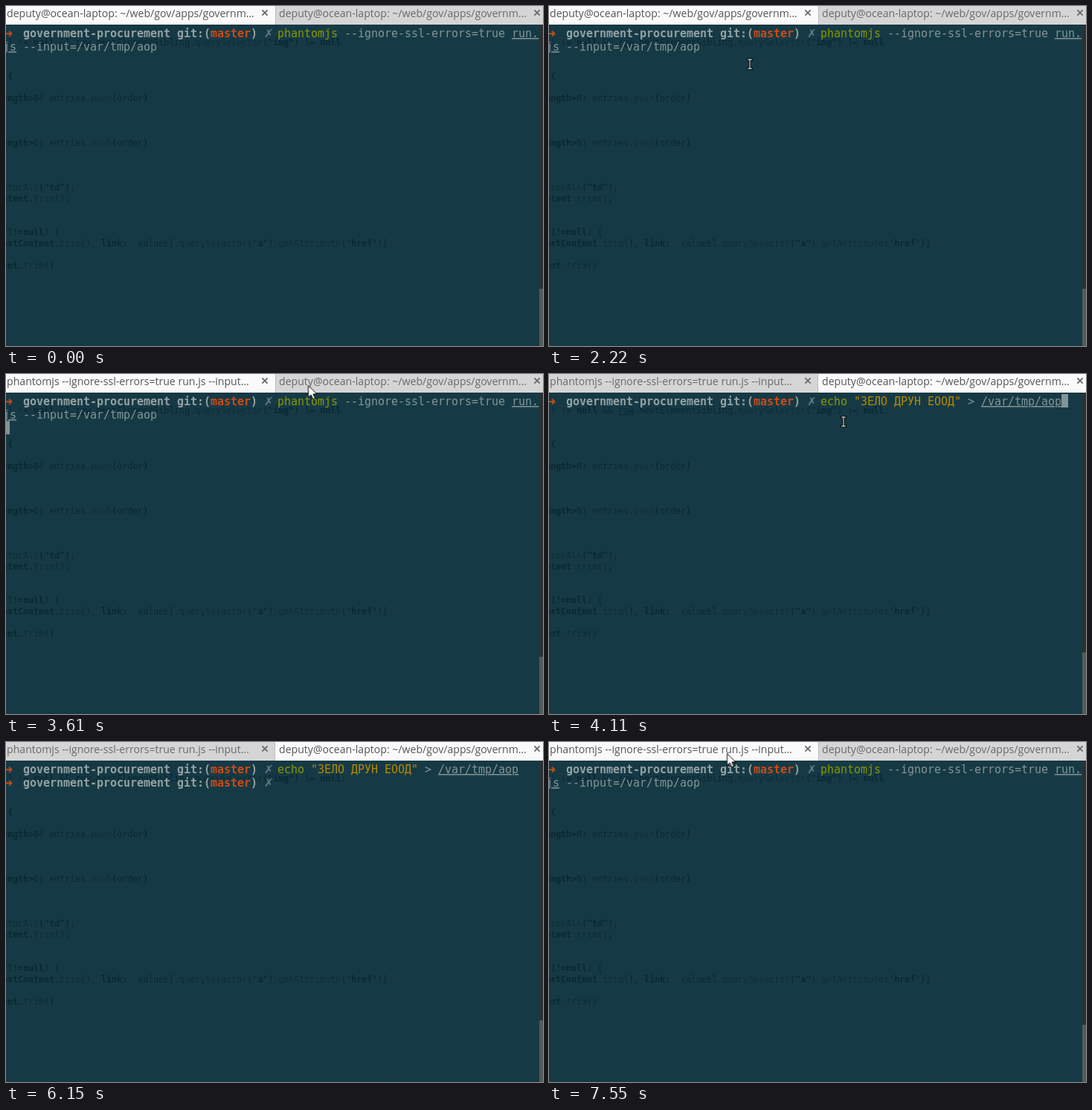
An HTML page for the animation above (8 s loop, 722x457 px).

```html
<!DOCTYPE html>
<html lang="en">
<head>
<meta charset="utf-8">
<title>Terminal tabs</title>
<style>
html, body { margin: 0; width: 100%; height: 100%; overflow: hidden; background: #163a45; }
svg { display: block; width: 722px; height: 457px; }
text { white-space: pre; }

.term { font: 15px "DejaVu Sans Mono", monospace; letter-spacing: -.03px; fill: #839496; }
.bold { font-weight: bold; fill: #93a1a1; }
.red { fill: #cb4b16; }
.dim { fill: #657b83; }
.green { fill: #859900; }
.yellow { fill: #b58900; }
.path { text-decoration: underline; }
.sign { font: bold 15px "DejaVu Sans", sans-serif; }

.code { font: 12px "DejaVu Sans Mono", monospace; letter-spacing: -.224px; fill: #0a2833; }
.code .b { font-weight: bold; }
.code .m { fill: #0f2d37; }

.title { font: 14.1px "Open Sans", "Noto Sans", sans-serif; }
.close { fill: none; stroke: #6a6a6a; stroke-width: 1.8; }

/* Every animation shares one 8 s loop; 1% = 80 ms */
.hard, .move { animation-duration: 8s; animation-iteration-count: infinite; }
.hard { animation-timing-function: step-end; }
.first { animation-name: first; }
.second { animation-name: second; }
.idle { animation-name: idle; }
.busy { animation-name: busy; }
.ink1 { animation-name: ink1; }
.ink2 { animation-name: ink2; }
.reply { animation-name: reply; }
.place { animation-name: place; }
.blink { animation-name: blink; }
.move { animation-name: move; }
.beam { animation-name: beam; }
.arrow { animation-name: arrow; }

@keyframes first { 0%, 87%, 100% { opacity: 1 } 46.375% { opacity: 0 } }
@keyframes second { 0%, 87%, 100% { opacity: 0 } 46.375% { opacity: 1 } }
@keyframes idle { 0% { opacity: 1 } 28.75%, 100% { opacity: 0 } }
@keyframes busy { 0% { opacity: 0 } 28.75%, 100% { opacity: 1 } }
@keyframes ink1 { 0%, 87%, 100% { fill: #565656 } 46.375% { fill: #696969 } }
@keyframes ink2 { 0%, 87%, 100% { fill: #696969 } 46.375% { fill: #565656 } }
@keyframes reply { 0% { opacity: 0 } 69.875%, 100% { opacity: 1 } }

@keyframes place {
  0% { transform: translate(203px, 45px) }
  28.75% { transform: translate(-4px, 63px) }
  46.375% { transform: translate(689px, 27px) }
  69.875% { transform: translate(365px, 45px) }
  87%, 100% { transform: translate(-4px, 63px) }
}
@keyframes blink {
  0%, 12.875%, 27.75%, 35.75%, 53.375%, 68.375%, 76.875%, 94.375%, 100% { opacity: 0 }
  5.375%, 20.375%, 28.25%, 43.25%, 60.875%, 69.375%, 84.375% { opacity: 1 }
}

@keyframes move {
  0%, 2.5% { transform: translate(718px, 450px); animation-timing-function: ease-out }
  8.75%, 38.25% { transform: translate(270px, 78px); animation-timing-function: ease-in-out }
  45.125%, 49.875% { transform: translate(406.5px, 15.5px); animation-timing-function: linear }
  51.375% { transform: translate(396px, 64px); animation-timing-function: ease-out }
  53.375%, 80.5% { transform: translate(396px, 68px); animation-timing-function: ease-in-out }
  86.5%, 100% { transform: translate(239.5px, 15.5px) }
}
@keyframes beam {
  0%, 28.25%, 42.875%, 69.375%, 84.25%, 100% { opacity: 0 }
  2.5%, 38.25%, 50.5%, 80.5% { opacity: 1 }
}
@keyframes arrow {
  0%, 50.5%, 100% { opacity: 0 }
  42.875%, 84.25% { opacity: 1 }
}
</style>
</head>
<body>
<svg viewBox="0 0 722 457">
  <defs>
    <g id="prompt">
      <text class="sign red" x="-3" y="42">➜</text>
      <text class="bold" x="23" y="42">government-procurement git:(<tspan class="red">master</tspan>)</text>
      <text class="sign dim" x="347" y="42">✗</text>
    </g>
    <path id="cross" class="close" d="M-3.6-3.6 3.6 3.6M3.6-3.6-3.6 3.6"/>
    <path id="ibeam" d="M-2.5-6H2.5M0-6V6M-2.5 6H2.5"/>
  </defs>

  <rect width="722" height="457" fill="#163a45"/>
  <path d="M527.5 25V457" stroke="#13343e"/>

  <!-- Editor showing through the window -->
  <g class="code">
    <text x="2" y="53">) != <tspan class="b">null</tspan> &amp;&amp; <tspan class="path">row</tspan>.nextElementSibling.<tspan class="m">querySelector</tspan>(<tspan class="b">"img"</tspan>) != <tspan class="b">null</tspan><tspan class="hard second">:</tspan></text>
    <text x="2" y="98" class="b">{</text>
    <text x="-5" y="128"><tspan class="b">ength&gt;</tspan>0) entries.<tspan class="m">push</tspan><tspan class="b">(</tspan>order<tspan class="b">)</tspan></text>
    <text x="-5" y="188"><tspan class="b">ength&gt;</tspan>0) entries.<tspan class="m">push</tspan><tspan class="b">(</tspan>order<tspan class="b">)</tspan></text>
    <text x="-5" y="248"><tspan class="m">ctorAll</tspan><tspan class="b">("td")</tspan>;</text>
    <text x="-5" y="263"><tspan class="b">ntent</tspan>.<tspan class="m">trim</tspan>();</text>
    <text x="-5" y="308"><tspan class="b">")!=null</tspan>) {</text>
    <text x="-5" y="323"><tspan class="b">extContent</tspan>.<tspan class="m">trim</tspan>(), <tspan class="b">link:</tspan>  valueEl.<tspan class="m">querySelector</tspan>(<tspan class="b">"a"</tspan>).<tspan class="m">getAttribute</tspan>(<tspan class="b">'href'</tspan>)}</text>
    <text x="-5" y="353"><tspan class="b">ent</tspan>.<tspan class="m">trim</tspan>()</text>
  </g>

  <!-- Tab strip and scrollbar -->
  <rect width="722" height="25" fill="#d5d5d5"/>
  <rect x="717" y="25" width="5" height="432" fill="#2d3031"/>
  <g class="hard first">
    <rect width="362" height="25" fill="#fafafa"/>
    <path d="M362.5 0V25" stroke="#bcbcbc"/>
    <rect x="717" y="380" width="5" height="77" fill="#54585a"/>
  </g>
  <g class="hard second">
    <rect x="362" width="360" height="25" fill="#fafafa"/>
    <path d="M361.5 0V25" stroke="#bcbcbc"/>
    <rect x="717" y="374" width="5" height="83" fill="#54585a"/>
  </g>
  <g class="title">
    <g class="hard ink1">
      <text class="hard idle" x="1" y="15">deputy@ocean-laptop: ~/web/gov/apps/governm…</text>
      <text class="hard busy" x="1" y="15">phantomjs --ignore-ssl-errors=true run.js --input…</text>
    </g>
    <text class="hard ink2" x="367" y="15">deputy@ocean-laptop: ~/web/gov/apps/governm…</text>
  </g>
  <use href="#cross" x="348" y="9"/>
  <use href="#cross" x="714" y="9"/>

  <g class="term">
    <use href="#prompt"/>
    <g class="hard first">
      <text x="365" y="42"><tspan class="green">phantomjs</tspan> --ignore-ssl-errors=true <tspan class="path">run.</tspan></text>
      <text x="-4" y="60"><tspan class="path">js</tspan> --input=/var/tmp/aop</text>
    </g>
    <g class="hard second">
      <text x="365" y="42"><tspan class="green">echo</tspan> <tspan class="yellow">"ЗЕЛО ДРУН ЕООД"</tspan> &gt; <tspan class="path">/var/tmp/aop</tspan></text>
      <g class="hard reply"><use href="#prompt" y="18"/></g>
    </g>
    <g class="hard place"><rect class="hard blink" width="9" height="18" fill="#839496"/></g>
  </g>

  <!-- Mouse pointer -->
  <g class="move">
    <g class="hard beam" fill="none" stroke-linecap="square">
      <use href="#ibeam" stroke="#000" stroke-width="3"/>
      <use href="#ibeam" stroke="#fff" stroke-width="1"/>
    </g>
    <path class="hard arrow" d="M0 0V16L3.7 12.6 6.2 18.2 9 17 6.5 11.5H11.4Z" fill="#fff" stroke="#000"/>
  </g>
</svg>
</body>
</html>
```
